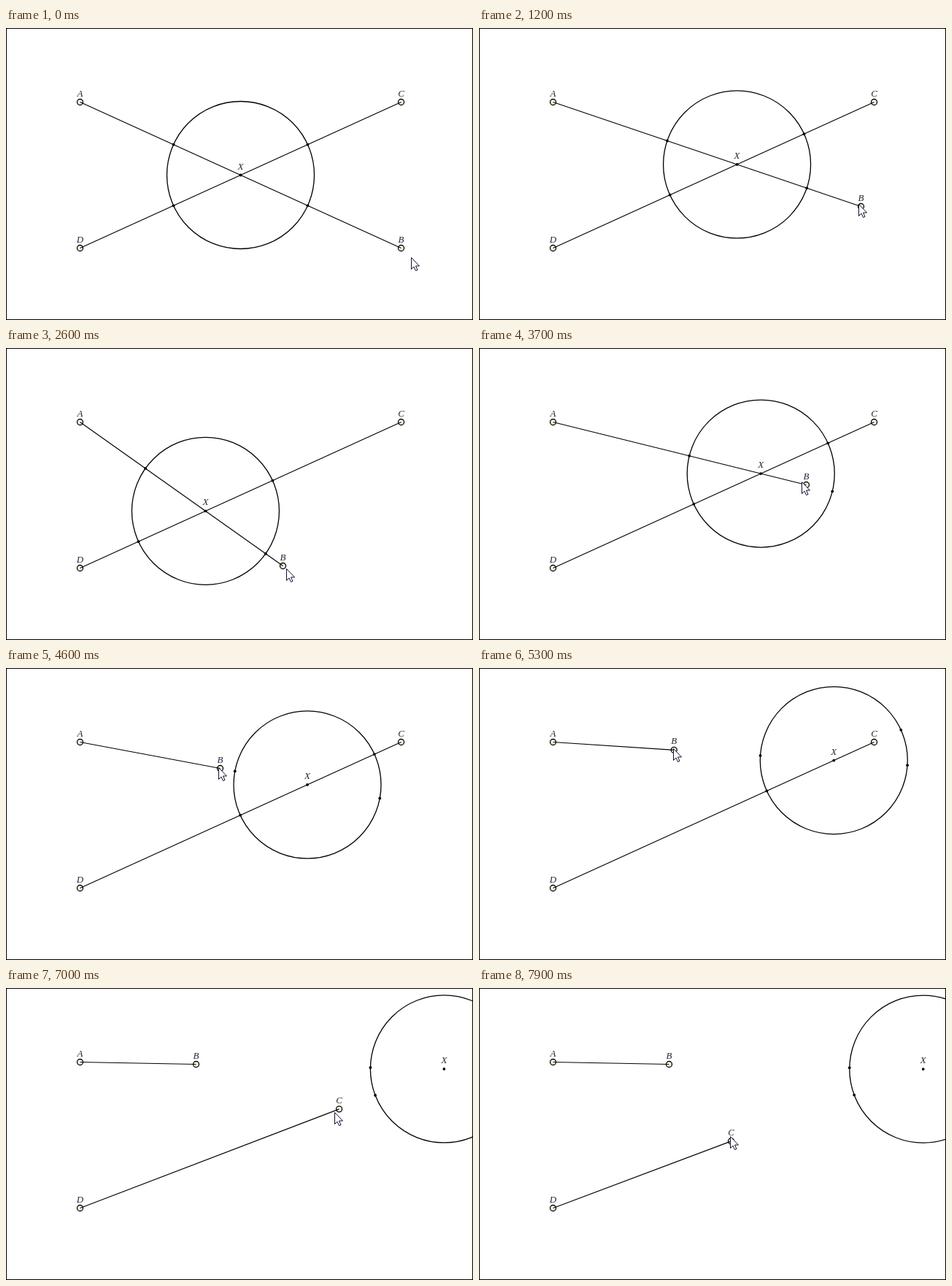
Recreate the animation shown at these times as an HTML page with a canvas. Size 640 by 400 pixels, loop 8000 ms.

```html
<!DOCTYPE html>
<html lang="en">
<head>
<meta charset="utf-8">
<title>Circle at a crossing</title>
<style>
  html, body { margin: 0; width: 100%; height: 100%; overflow: hidden; background: #fff; }
  canvas { display: block; }
</style>
</head>
<body>
<canvas id="stage" width="640" height="400"></canvas>
<script>
const ctx = document.getElementById('stage').getContext('2d');
const LOOP = 8000, STEP = 100, RADIUS = 101;
const POINTER_LEAD = 33; // dragged points trail the pointer slightly
const A = [101, 101], D = [101, 301], INK = '#000';

// Each gesture is a smooth curve through a few key points: [time, x, y]
const approach = [[80, 555, 314], [530, 541, 301]];
const dragB = [
  [600, 541, 301], [1200, 523, 244], [1700, 455, 193], [2300, 350, 240],
  [2600, 379, 298], [2900, 440, 315], [3300, 492, 255], [3700, 448, 187],
  [4200, 330, 134], [4600, 293, 137], [5500, 260, 104]
];
const travel = [[5600, 260, 104], [6130, 554, 97], [6430, 541, 101]];
const dragC = [[6500, 541, 101], [7400, 390, 215], [7700, 350, 243], [7900, 345, 209.4], [8100, 342, 165]];
const gestures = [approach, dragB, travel, dragC];

// Cubic Hermite curve with finite-difference tangents, held at both ends
function follow(keys, time) {
  const last = keys.length - 1;
  const t = Math.min(Math.max(time, keys[0][0]), keys[last][0]);
  let i = 0;
  while (i < last - 1 && keys[i + 1][0] <= t) i++;
  const p = keys[i], q = keys[i + 1];
  const before = keys[Math.max(i - 1, 0)], after = keys[Math.min(i + 2, last)];
  const span = q[0] - p[0], u = (t - p[0]) / span;
  return [1, 2].map(k => {
    const m0 = span * (q[k] - before[k]) / (q[0] - before[0]);
    const m1 = span * (after[k] - p[k]) / (after[0] - p[0]);
    const d = q[k] - p[k];
    return p[k] + u * (m0 + u * (3 * d - 2 * m0 - m1 + u * (m0 + m1 - 2 * d)));
  });
}

function pointerAt(t) {
  const current = gestures.findLast(keys => keys[0][0] <= t) || approach;
  return follow(current, t);
}

function crossing(p, q, r, s) {
  const ax = q[0] - p[0], ay = q[1] - p[1], bx = s[0] - r[0], by = s[1] - r[1];
  const k = ((r[0] - p[0]) * by - (r[1] - p[1]) * bx) / (ax * by - ay * bx);
  return [p[0] + k * ax, p[1] + k * ay];
}

function circle([x, y], r) {
  ctx.beginPath();
  ctx.arc(x, y, r, 0, 2 * Math.PI);
}

function dot(p) {
  circle(p, 1.9);
  ctx.fillStyle = INK;
  ctx.fill();
}

function ring(p) {
  circle(p, 4);
  ctx.fillStyle = '#ffffe4';
  ctx.fill();
  ctx.stroke();
}

function segment(p, q) {
  ctx.beginPath();
  ctx.moveTo(...p);
  ctx.lineTo(...q);
  ctx.stroke();
}

function rimDots([x, y], p, q) {
  const angle = Math.atan2(q[1] - p[1], q[0] - p[0]);
  for (const r of [-RADIUS, RADIUS])
    dot([x + r * Math.cos(angle), y + r * Math.sin(angle)]);
}

function drawPointer([x, y]) {
  const arrow = new Path2D('M0 0V16L3.5 12.5L6 18L8.5 17L6 11.5H11Z');
  ctx.save();
  ctx.translate(Math.round(x), Math.round(y));
  ctx.lineWidth = 1;
  ctx.fillStyle = '#fff';
  ctx.fill(arrow);
  ctx.strokeStyle = '#101030';
  ctx.stroke(arrow);
  ctx.restore();
}

function draw(t) {
  const B = follow(dragB, t), C = follow(dragC, t);
  const X = crossing(A, B, D, C);

  ctx.setTransform(1, 0, 0, 1, 0.5, 0.5);
  ctx.fillStyle = '#fff';
  ctx.fillRect(-1, -1, 642, 402);
  ctx.strokeStyle = INK;

  ctx.lineWidth = 1.3;
  circle(X, RADIUS);
  ctx.stroke();
  [A, B, C, D].forEach(ring);
  ctx.lineWidth = 1.15;
  segment(A, B);
  segment(D, C);
  rimDots(X, A, B);
  rimDots(X, D, C);
  dot(X);

  ctx.font = 'italic 13px "Liberation Serif", serif';
  ctx.textAlign = 'center';
  ctx.fillStyle = '#26263c';
  for (const [name, [x, y]] of Object.entries({ A, B, C, D, X }))
    ctx.fillText(name, x, y - 8);

  drawPointer(pointerAt(t + POINTER_LEAD));
  ctx.lineWidth = 1;
  ctx.strokeRect(0, 0, 639, 399);
}

const start = performance.now();
function tick() {
  const t = (performance.now() - start) % LOOP;
  draw(Math.floor(t / STEP) * STEP);
  requestAnimationFrame(tick);
}
tick();
</script>
</body>
</html>
```
